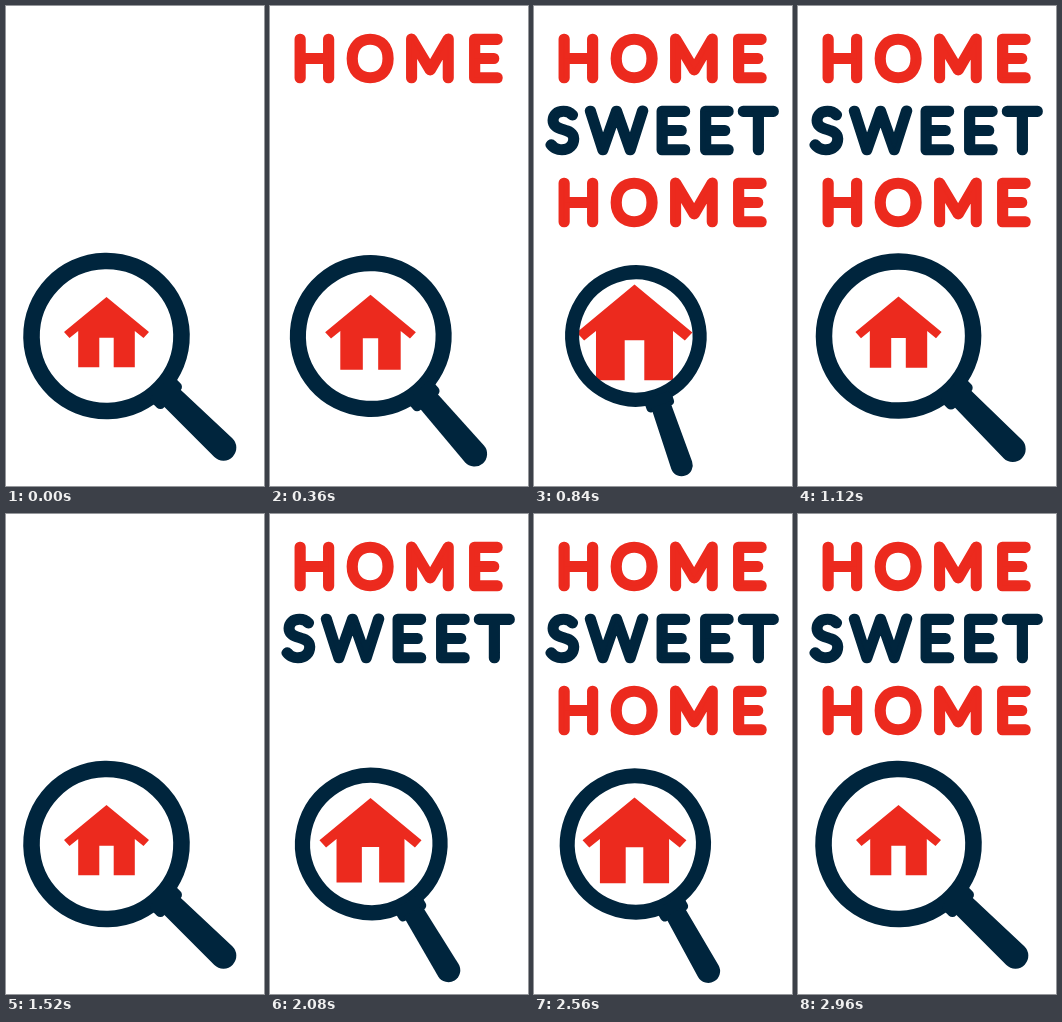
Write an HTML page with a canvas that moves like this. It is 258 px wide and 480 px high and loops after 3000 ms.

```html
<!DOCTYPE html>
<html lang="en">
<head>
<meta charset="utf-8">
<title>Home sweet home</title>
<style>
  html, body { margin: 0; width: 100%; height: 100%; overflow: hidden; background: #fff; }
  canvas { display: block; width: 258px; height: 480px; }
</style>
</head>
<body>
<canvas id="stage" role="img" aria-label="Home sweet home"></canvas>
<script>
const W = 258, H = 480, LOOP = 3000, TEXT_LOOP = 1500;
const NAVY = '#00253d', RED = '#ec2a1e';
const canvas = document.getElementById('stage');
const ctx = canvas.getContext('2d');
const dpr = window.devicePixelRatio || 1;
canvas.width = W * dpr;
canvas.height = H * dpr;

// Each line pops in at its own time within the text cycle.
const lines = [
  { text: 'HOME', at: 160, y: 71.6, color: RED, gap: 12.5 },
  { text: 'SWEET', at: 400, y: 144, color: NAVY, gap: 10.5 },
  { text: 'HOME', at: 640, y: 216.4, color: RED, gap: 12.5 }
];

const SWING = 465;            // half the length of one swing, ms
const PEAKS = [708, 2328];    // moments of the deepest swing

function swing(t) {
  for (const peak of PEAKS) {
    const x = (t - peak) / SWING;
    if (Math.abs(x) < 1) return (1 + Math.cos(Math.PI * x)) / 2;
  }
  return 0;
}

function polygon(points) {
  ctx.beginPath();
  points.forEach(([x, y]) => ctx.lineTo(x, y));
  ctx.closePath();
  ctx.fill();
}

// A thin face with a heavy round outline gives rounded letters.
function drawLine({ text, y, color, gap }) {
  ctx.font = '100 56.5px Lato, Inter, sans-serif';
  ctx.letterSpacing = gap + 'px';
  ctx.lineJoin = ctx.lineCap = 'round';
  ctx.lineWidth = 10.5;
  ctx.fillStyle = ctx.strokeStyle = color;
  const ink = ctx.measureText(text);
  const x = 128.5 + (ink.actualBoundingBoxLeft - ink.actualBoundingBoxRight) / 2;
  ctx.strokeText(text, x, y);
  ctx.fillText(text, x, y);
}

function drawGlass(p) {
  const size = 1 - 0.187 * p;
  ctx.save();
  ctx.translate(100.5 + 1.7 * p, 330);
  ctx.rotate((43.7 + 33 * p) * Math.PI / 180);
  ctx.scale(size, size);
  ctx.fillStyle = ctx.strokeStyle = NAVY;

  ctx.lineWidth = 16.6;
  ctx.beginPath();
  ctx.arc(0, 0, 75, 0, Math.PI * 2);
  ctx.stroke();

  ctx.beginPath();
  ctx.roundRect(74, -17, 17, 34, 5);
  ctx.fill();

  ctx.beginPath();
  ctx.moveTo(86, -12.2);
  ctx.lineTo(161.6, -13);
  ctx.arc(161.6, 0, 13, -Math.PI / 2, Math.PI / 2);
  ctx.lineTo(86, 11.2);
  ctx.fill();
  ctx.restore();
}

function drawHouse(p) {
  const size = 1 + 0.445 * p;
  ctx.save();
  ctx.translate(100.5, 325.3);
  ctx.scale(size, size);
  ctx.fillStyle = RED;
  const right = [[42.5, 0.8], [37, 6.8], [28.3, -0.3], [28.3, 36], [7.2, 36], [7.2, 6.5]];
  const left = right.map(([x, y]) => [-x, y]).reverse();
  polygon([[0, -34.3], ...right, ...left]);
  ctx.restore();
}

function draw(t) {
  ctx.setTransform(dpr, 0, 0, dpr, 0, 0);
  ctx.fillStyle = '#fff';
  ctx.fillRect(0, 0, W, H);
  lines.filter(line => t % TEXT_LOOP >= line.at).forEach(drawLine);
  const p = swing(t);
  drawHouse(p);
  drawGlass(p);
}

const start = performance.now();
function tick() {
  draw((performance.now() - start) % LOOP);
  requestAnimationFrame(tick);
}
draw(0);
requestAnimationFrame(tick);
</script>
</body>
</html>
```
